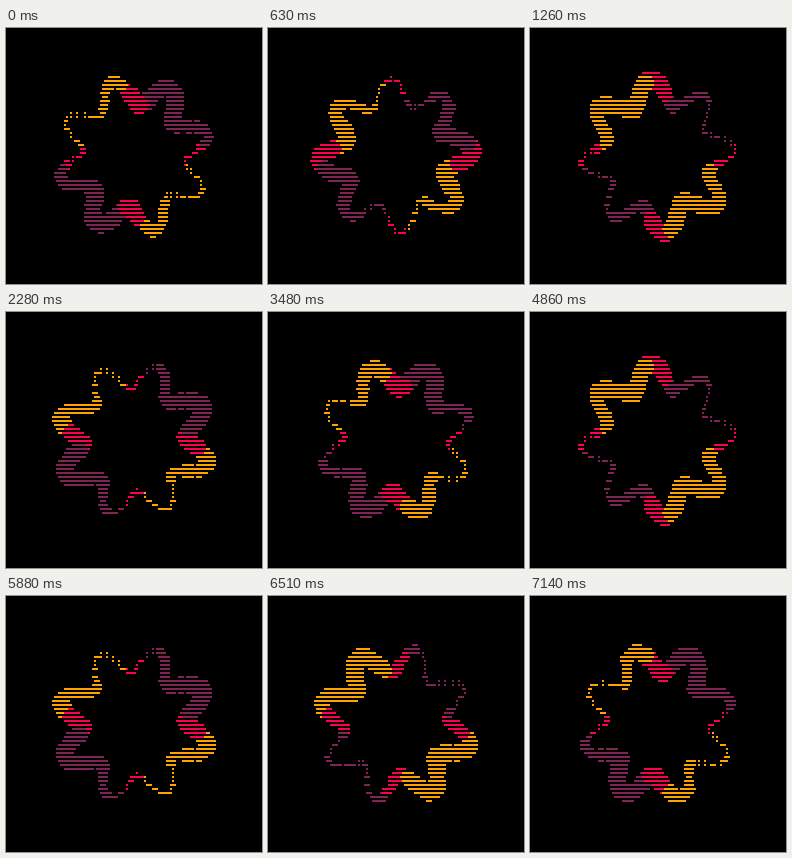
Recreate the animation shown at these times as an HTML page with a canvas. Size 256 px wide and 256 px high, loop 7170 ms.

```html
<!DOCTYPE html>
<html>
<head>
<meta charset="utf-8">
<style>
html, body { margin: 0; width: 100%; height: 100%; overflow: hidden; background: #000; }
canvas { display: block; width: 256px; height: 256px; image-rendering: pixelated; }
</style>
</head>
<body>
<canvas id="stage" width="256" height="256"></canvas>
<script>
const ctx = document.getElementById('stage').getContext('2d');
const LOOP = 7170, STEP = 30, PERIOD = 120, DOTS = 100, PX = 2;
const ORANGE = '#ffa300', RED = '#ff004d', PURPLE = '#7e2553';
const RAD = Math.PI / 180;

// Filled pixel disc, visible on even rows only
function disc(cx, cy, r, color) {
  ctx.fillStyle = color;
  for (let dy = -r; dy <= r; dy++) {
    const y = cy + dy;
    if (y % 2) continue;
    const half = Math.floor(Math.sqrt(r * r + r * 0.9 - dy * dy));
    ctx.fillRect((cx - half) * PX, y * PX, (half * 2 + 1) * PX, PX);
  }
}

function sectorColor(a) {
  const s = Math.sin(2 * a);
  return s > 1 / 3 ? PURPLE : s < -1 / 3 ? ORANGE : RED;
}

function draw(step) {
  const turn = step / PERIOD * 2 * Math.PI;
  const lobe = (16.5 - 13.2 * Math.sin(turn)) * RAD;
  const thin = (152 + 4 * Math.cos(turn)) * RAD - turn;
  ctx.fillStyle = '#000';
  ctx.fillRect(0, 0, 256, 256);
  for (let i = 0; i < DOTS; i++) {
    const a = i / DOTS * 2 * Math.PI;
    const dist = 32 + 6.5 * Math.cos(8 * (a - lobe));
    const size = Math.min(4, Math.floor(3 - 2 * Math.cos(2 * (a - thin))));
    disc(Math.floor(64 + dist * Math.cos(a)), Math.floor(64 - dist * Math.sin(a)), size, sectorColor(a));
  }
}

const start = performance.now();
function tick() {
  const t = Math.max(0, performance.now() - start) % LOOP;
  draw(Math.floor(t / STEP));
  requestAnimationFrame(tick);
}
tick();
</script>
</body>
</html>
```
